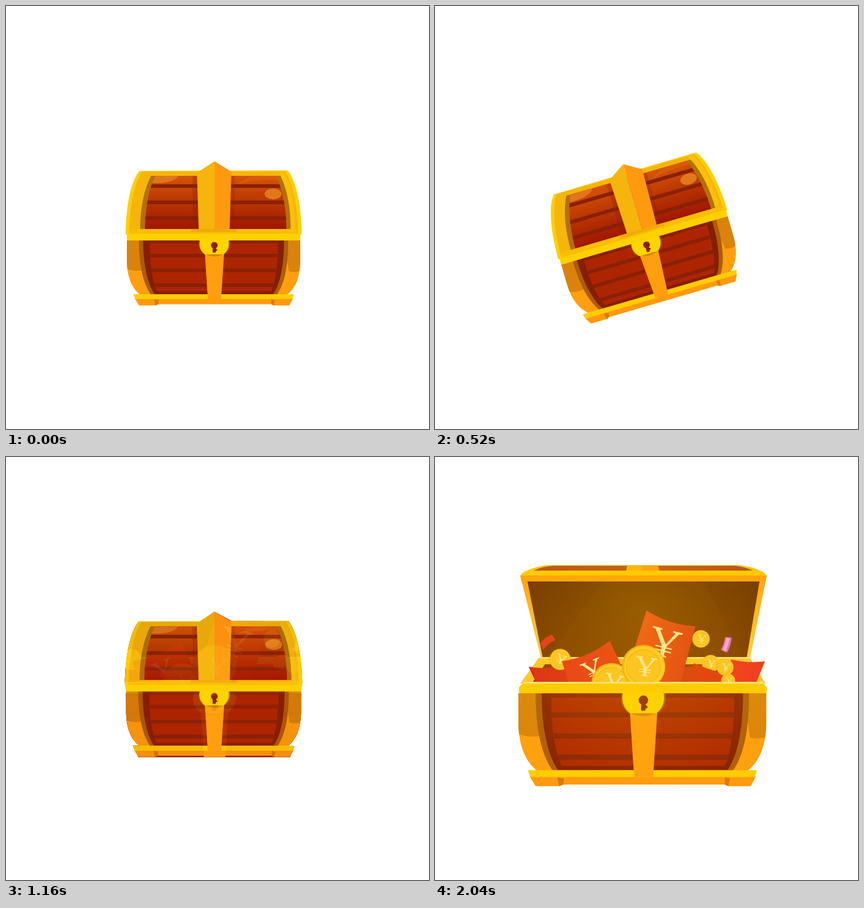
An HTML page for the animation above (2.36 s loop, 700 by 700 pixels).

```html
<!DOCTYPE html>
<html>
<head>
<meta charset="utf-8">
<style>
html, body { margin: 0; width: 100%; height: 100%; overflow: hidden; background: #fff; }
svg { display: block; width: 100vw; height: 100vh; }
</style>
</head>
<body>
<svg viewBox="0 0 700 700">
  <defs>
    <linearGradient id="lidWood" x1="0" y1="0" x2="0" y2="1">
      <stop stop-color="#d4540a"/><stop offset=".5" stop-color="#b93500"/><stop offset="1" stop-color="#a01700"/>
    </linearGradient>
    <linearGradient id="inside" x1="0" y1="0" x2="0" y2="1">
      <stop stop-color="#632a00"/><stop offset="1" stop-color="#733200"/>
    </linearGradient>
    <linearGradient id="side" x1="0" y1="0" x2="0" y2="1">
      <stop stop-color="#ff9f0f"/><stop offset="1" stop-color="#ffd44a"/>
    </linearGradient>
    <linearGradient id="packet" x1="0" y1="0" x2="1" y2="0">
      <stop stop-color="#f04a1e"/><stop offset="1" stop-color="#da3417"/>
    </linearGradient>
    <radialGradient id="light">
      <stop stop-color="#ffc400"/><stop offset=".5" stop-color="#ffc400" stop-opacity=".55"/>
      <stop offset="1" stop-color="#ffc400" stop-opacity="0"/>
    </radialGradient>
    <path id="lidPlanks" d="M230 369C230 338 236 304 247 281H447C458 304 464 338 464 369Z"/>
    <path id="bodyPlanks" d="M238 388C238 425 241 452 250 472H439C447 452 450 425 450 388Z"/>
    <path id="bodyShape" d="M200 388V420C200 448 208 467 222 478H465C479 467 487 448 487 420V388Z"/>
    <!-- yen sign, one unit tall, centred on the origin -->
    <g id="yen" fill="#fff0b4">
      <path d="M-.55 -.5H-.2V-.45L-.27 -.43 .05 .04 .3 -.42 .2 -.45V-.5H.55V-.45L.42 -.42 .08 .13V.43L.18 .46V.5H-.18V.46L-.07 .43V.13L-.43 -.42 -.55 -.45Z"/>
      <path d="M-.3 .13H.3V.18H-.3ZM-.3 .26H.3V.31H-.3Z"/>
    </g>
    <clipPath id="lidClip"><use href="#lidPlanks"/></clipPath>
    <clipPath id="plankClip"><use href="#bodyPlanks"/></clipPath>
    <clipPath id="bodyClip"><use href="#bodyShape"/></clipPath>
    <clipPath id="closedClip">
      <path id="outline" d="M198 376C198 340 205 290 221 273H322L345 257 372 272H466C482 290 489 340 489 375L487 388V420C487 448 479 467 465 478H476L469 495.500H220L211 477H222C208 467 200 448 200 420V388Z"/>
    </clipPath>
    <clipPath id="openClip">
      <path d="M141 195C150 186 170 180 190 179H500C520 180 540 186 549 195L521 335 546 338 541 372 549 381V437C549 475 538 502 518 519H533L523 546H167L155 519H169C150 502 138 475 138 437V381L147 373 165 360 156 347 176 335Z"/>
    </clipPath>
    <clipPath id="lootClip"><rect x="130" y="170" width="430" height="204"/></clipPath>

    <g id="body">
      <use href="#bodyShape" fill="#ff9f0f"/>
      <path clip-path="url(#bodyClip)" fill="#d9830c" d="M200 388H228V437Q212 440 200 435ZM460 388H487V438Q479 442 468 439Z"/>
      <path fill="#ad5c08" d="M220 388C220 430 227 460 240 478H448C461 460 467 430 467 388Z"/>
      <path fill="#851e05" d="M227 388C227 428 234 460 246 477H442C454 460 460 428 460 388Z"/>
      <use href="#bodyPlanks" fill="#ad2500"/>
      <path clip-path="url(#plankClip)" stroke="#8a2006" stroke-width="6" d="M230 390H460M230 413H460M230 437.500H460M230 462H460"/>
      <path fill="#ff9a10" d="M213 484H475L469 495.500H443L439 493.500H252L248 495.500H220Z"/>
      <path fill="#d97a08" d="M245 485L253 487 252 493.500 247 495.500ZM439 485L445 487 443 495.500 439 493.500Z"/>
      <path fill="#ffcd00" d="M211 477H476L474 485H214Z"/>
      <path fill="#ff9f10" d="M329 408H361L356 485H334Z"/>
      <path fill="#d9830c" d="M329 410H360Q345 419 329 410Z"/>
      <path fill="#a66505" d="M320 388Q316 402 328 411H361Q373 402 370 388Z"/>
      <path fill="#ffd400" d="M321 387Q318 402 329 411H360Q371 402 368 387Z"/>
      <path fill="#8a2006" d="M342 398V408H347V406L350 404 347 401V398Z"/>
      <circle cx="344.700" cy="396" r="5.500" fill="#8a2006"/>
    </g>
  </defs>

  <g id="open">
    <path fill="#ffc400" d="M141 197C150 186 170 180 190 179H500C520 180 540 186 549 197Z"/>
    <path fill="#b5441a" d="M163 188Q178 181 195 180H495Q512 181 526 188Z"/>
    <path fill="#ffb40c" d="M318 179H344V191H316Z"/>
    <path fill="#ff9a10" d="M343 179H369L372 191H343Z"/>
    <path fill="#ffcd00" d="M152 188H538Q546 191 549 197H141Q144 191 152 188Z"/>
    <path fill="url(#side)" d="M141 196H549L521 335H176Z"/>
    <path fill="#ff9f0f" d="M141 196H549L547 206H143Z"/>
    <path fill="url(#inside)" d="M153 206H537L516 331H178Z"/>
    <path fill="#8a4a00" opacity=".14" d="M278 206H445L510 331H185Z"/>
    <path fill="#ffc830" d="M172 332H521L547 375H141Z"/>
    <path fill="#ffe27a" d="M174 331H521V334H174Z"/>
    <path fill="#8a3206" d="M182 343H508L530 375H160Z"/>
    <g id="loot" clip-path="url(#lootClip)"></g>
    <path fill="#e02c1c" d="M174 309Q182 297 194 294L199 303Q188 307 179 319Z"/>
    <path fill="#d768dc" d="M480 298L491 299Q490 312 483 324L473 319Q479 309 480 298Z"/>
    <path fill="#ff9bf2" d="M482 299L488 300Q486 311 481 322L476 319Q481 309 482 299Z"/>
    <use href="#body" transform="translate(-148.100 -163.800) scale(1.430)"/>
    <path fill="#ffcd00" d="M147 373H542L549 381V391H139V381Z"/>
    <path fill="#ffe680" d="M147 372H542L544 375H145Z"/>
    <path fill="#ffd400" d="M311 390H378V394H311Z"/>
    <g clip-path="url(#openClip)"><circle id="glow" cx="345" cy="260" fill="url(#light)"/></g>
  </g>

  <g id="closed">
    <use href="#body"/>
    <path fill="#ffcf00" d="M198 376C198 340 205 290 221 273L466 272C482 290 489 340 489 375Z"/>
    <path fill="#f5b50c" d="M204 374C204 340 211 295 225 274H462C476 295 483 340 483 374Z"/>
    <path fill="#ffc908" d="M472 374C473 335 463 296 451 275H460C473 296 479 335 478 374Z" opacity=".5"/>
    <path fill="#b5700a" d="M222 370C222 336 228 304 240 281H454C466 304 471 336 471 370Z"/>
    <use href="#lidPlanks" fill="url(#lidWood)"/>
    <g clip-path="url(#lidClip)">
      <path fill="#e0761c" d="M236 281H285Q278 293 250 293H236Z"/>
      <path fill="#dc600e" d="M382 295Q398 282 420 281H447L450 288Q415 286 382 295Z" opacity=".7"/>
      <path stroke="#8a2006" stroke-width="6" d="M225 298H470M225 325H470M225 351H470"/>
      <ellipse cx="442" cy="311" rx="14" ry="9" fill="#e0791c"/>
      <path fill="#8a2006" opacity=".3" d="M309 281H318V369H309ZM371 281H378V369H371Z"/>
    </g>
    <path fill="#f9bd06" d="M203 369H484V378H203Z"/>
    <path fill="#ffcd00" d="M198 373H204V378H489V373H483V378H198Z"/>
    <path fill="#f5b50c" d="M345 257L322 272 316 277 319 371H345Z"/>
    <path fill="#ff9a0e" d="M345 257L373 274 370 371H345Z"/>
    <path fill="#f0aa08" d="M306 369H382V374H306Z"/>
    <path fill="#ffd000" d="M200 377H487V388H200Z"/>
  </g>
</svg>
<script>
const $ = id => document.getElementById(id);

const yen = (x, y, size, turn) =>
  `<use href="#yen" transform="translate(${x} ${y}) rotate(${turn}) scale(${size})"/>`;

const coin = (x, y, r, turn = 8) =>
  `<circle cx="${x}" cy="${y}" r="${r}" fill="#efb11e"/>
   <circle cx="${x + r * .04}" cy="${y}" r="${r * .94}" fill="#ffcf2c"/>
   <circle cx="${x}" cy="${y}" r="${r * .78}" fill="#fcc52a" stroke="#efb422" stroke-width="${r * .04}"/>` +
  yen(x + r * .1, y, r * .88, turn);

const packet = (d, fill) => `<path d="${d}" fill="${fill}"/>`;

$('loot').innerHTML =
  packet('M155 347Q184 353 222 344V375H168Z', '#d8231a') +
  packet('M490 335Q520 342 546 338L531 375H482Z', '#ee2e22') +
  packet('M404 350L430 346 445 375H400Z', '#d22f10') +
  coin(207, 335, 17.500, 20) + coin(440, 301, 14.500) + coin(456, 342, 14.500) +
  packet('M428 341Q455 353 480 358V375H432Z', '#dc2c12') +
  packet('M350 254Q388 278 431 280L406 375H312Z', 'url(#packet)') +
  yen(380, 308, 46, 14) +
  packet('M210 338Q257 331 289 304L306 340 315 375H222Z', '#e5301b') +
  yen(261, 352, 31, -22) +
  coin(480, 348, 14) + coin(485, 370, 11.500) +
  coin(292, 374, 33, 12) + coin(345, 347, 36);

const clamp = u => Math.min(1, Math.max(0, u));
const part = (t, from, to) => clamp((t - from) / (to - from));
const ease = u => u * u * (3 - 2 * u);

// eased track through evenly spaced values
function track(t, from, to, values) {
  const p = part(t, from, to) * (values.length - 1);
  const i = Math.min(Math.floor(p), values.length - 2);
  return values[i] + (values[i + 1] - values[i]) * ease(p - i);
}

function draw(t) {
  const angle = track(t, 0, 686, [0, -16.3, 16.3, -16.3, 0]);
  const scale = t < 1100
    ? track(t, 686, 1000, [1, 1.29, 1])
    : track(t, 1100, 1810, [1, 1.43]);
  const pose = `translate(344.5 377) rotate(${angle}) scale(${scale}) translate(-344.5 -377)`;
  $('closed').setAttribute('transform', pose);
  $('outline').setAttribute('transform', pose);

  // the open chest stays inside the closed outline until it is half faded in
  const fade = part(t, 1110, 1630);
  $('open').style.display = fade > 0 ? '' : 'none';
  $('open').setAttribute('clip-path', fade < .5 ? 'url(#closedClip)' : 'none');
  $('closed').style.display = fade < 1 ? '' : 'none';
  $('closed').setAttribute('opacity', 1 - fade);

  const spread = part(t, 1460, 2040);
  $('glow').setAttribute('r', 330 * spread);
  $('glow').setAttribute('opacity', .47 - .17 * spread);
}

const start = performance.now();
function loop() {
  const t = (performance.now() - start) % 2360;
  draw(Math.min(2040, Math.floor(t / 40) * 40));
  requestAnimationFrame(loop);
}
loop();
</script>
</body>
</html>
```
